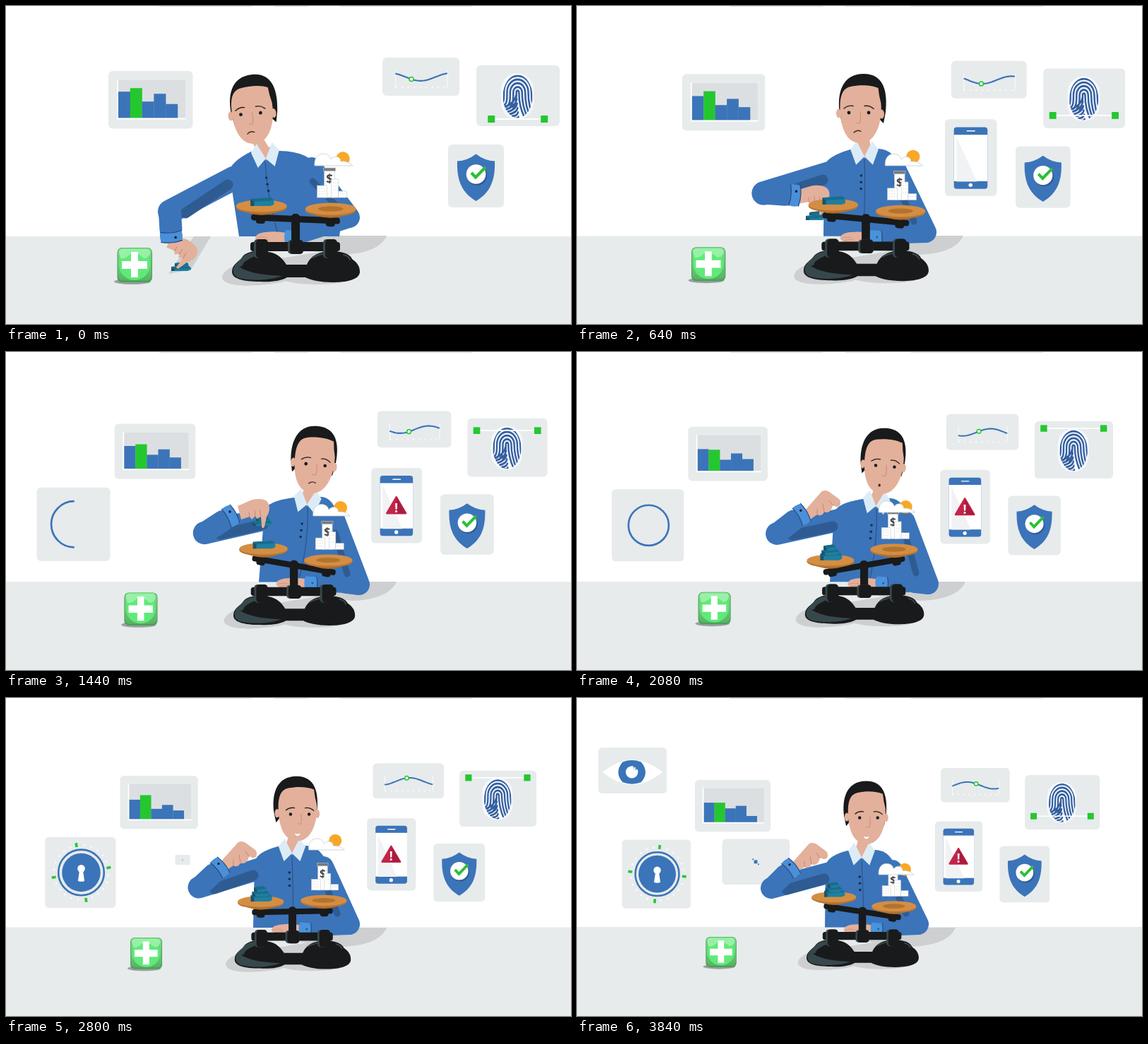
Write an HTML page that moves like this. It is 800 px wide and 450 px high and loops after 3920 ms.

```html
<!DOCTYPE html>
<html lang="en">
<head>
<meta charset="utf-8">
<title>Weighing choices</title>
<style>
html, body { margin: 0; width: 100%; height: 100%; overflow: hidden; background: #fff; }
svg { display: block; width: 800px; height: 450px; }
text { font-family: "Open Sans", Arial, sans-serif; font-weight: bold; text-anchor: middle; }
.panel { fill: #e7ebec; }
.blue { fill: #3b74b9; }
.dark { fill: #2e5c92; }
.green { fill: #25c72f; }
.white { fill: #fff; }
.skin { fill: #e3b09b; }
.ink { fill: #191a1b; }
.slate { fill: #37484d; }
.shade { fill: #cdcfd0; }
.line { fill: none; stroke-linecap: round; stroke-linejoin: round; }
.sleeve { fill: none; stroke: #3b74b9; stroke-linecap: round; stroke-linejoin: round; }
</style>
</head>
<body>
<svg id="stage" viewBox="0 0 800 450" xmlns="http://www.w3.org/2000/svg"></svg>
<script>
const LOOP = 3920, STEP = 80, LAST = 3840;
const rect = (x, y, w, h, cls, r = 0) =>
  `<rect x="${x}" y="${y}" width="${w}" height="${h}" rx="${r}" class="${cls}"/>`;
const disc = (x, y, r, cls, ry = r) => `<ellipse cx="${x}" cy="${y}" rx="${r}" ry="${ry}" class="${cls}"/>`;
const shape = (d, cls) => `<path d="${d}" class="${cls}"/>`;
const line = (d, color, w, id = "") => `<path ${id && `id="${id}"`} d="${d}" class="line" stroke="${color}" stroke-width="${w}"/>`;
const group = (id, body) => `<g id="${id}">${body}</g>`;

// One step of the blue weight, standing on y.
const tier = (x, y, w, h) => `
  <path d="M${x - w / 2} ${y - h + 2}L${x + w / 2 - 4} ${y - h}l4 4v${h - 6}l-5 2H${x - w / 2}z" fill="#1f7fa0"/>
  <path d="M${x - w / 2} ${y - h + 2}l5 4V${y}h-5z" fill="#1a5268"/>
  <path d="M${x - w / 2} ${y - h + 2}L${x + w / 2 - 4} ${y - h}l4 4L${x - w / 2 + 5} ${y - h + 6}z" fill="#1a6c8a"/>`;

const plate = well => `
  <path d="M-35 2Q-18 13 0 13Q18 13 35 2z" fill="#a9682b"/>
  <ellipse rx="36" ry="9" fill="#b97430" cy="2"/><ellipse rx="36" ry="8.5" fill="#d48e43"/>
  ${well ? '<ellipse rx="18" ry="3.8" fill="#b3732f"/>' : ""}`;

function ridges() {
  let s = "";
  for (let i = 0; i < 6; i++) {
    const r = 1.8 + i * 4.4;
    s += `M${-r - 5} ${15 - i * 1.5}C${-r} 9 ${-r} 3 ${-r} -5A${r} ${r} 0 0 1 ${r} -5C${r} 8 ${r + 3} 16 ${r + 8} 25`;
    s += `M${-20 + i * 3} ${13 + i * 2.6}Q${-4 + i} ${8 + i * 3.6} ${-2 + i * .6} ${-2 + i * 5.2}`;
  }
  return s;
}

const wall = `
<g>${rect(145, 92, 119.5, 81.5, "panel", 6)}
  <rect x="157" y="105" width="97" height="55" fill="#dcdfe1"/>
  ${[0, 1, 2, 3, 4].map(i => `<rect class="bar ${i == 1 ? "green" : "blue"}" x="${159 + i * 16.8}" width="17"/>`).join("")}
  ${line("M158 105V159.5H254", "#fff", 2)}</g>
<g>${rect(533, 73, 109, 54, "panel", 6)}
  ${line("M551.5 92V115M625 92V115", "#f8f9fa", 1.2)}
  <path d="M552 115H625" stroke="#fff" stroke-width="2" stroke-dasharray="1.5 7"/>
  ${line("", "#3b74b9", 2.2, "wave")}
  <circle id="dot" r="3" fill="#fff" stroke="#25c72f" stroke-width="1.6"/></g>
<g>${rect(666, 84, 118, 86, "panel", 6)}
  <rect x="701" y="95" width="46" height="65" rx="23" fill="#f6f9fd"/>
  <g transform="translate(724.5 128)" clip-path="url(#print)">
    <path transform="scale(1 1.2)" d="${ridges()}" fill="none" stroke="#345f9f" stroke-width="2.5" stroke-linecap="round"/></g>
  <g id="scan"><path id="beamline" stroke="#fff" stroke-width="1.8"/>
    <rect id="scanL" y="-5" width="10" height="10" class="green"/><rect id="scanR" y="-5" width="10" height="10" class="green"/></g></g>
<g>${rect(626, 196, 79, 89, "panel", 6)}
  ${shape("M665.5 209.5Q653 219 639 219.5C638 246 645 264 665.5 276C686 264 693 246 692 219.5Q678 219 665.5 209.5z", "blue")}
  <circle cx="667" cy="240" r="14" fill="#2e5c92"/>${disc(665.5, 238, 13.8, "white")}
  <path d="M659 236l6 6.5L679 228" fill="none" stroke="#2cbf33" stroke-width="4.2"/></g>
${group("phone", rect(524, 157, 75, 111, "panel", 6) +
  rect(537, 168.5, 48.5, 89, "blue", 4) + rect(537, 179.5, 48.5, 67, "white") +
  '<path d="M541 183L570 247H541z" fill="#f1f2f4"/>' +
  line("M556 174H567", "#fff", 1.5) + disc(561, 252, 2.8, "white") +
  group("alert", '<path d="M561 200L575 224H547z" fill="#c4244a" stroke="#c4244a" stroke-width="2.5" stroke-linejoin="round"/><path d="M561 200L575 224H561z" fill="#a91c40"/><text x="561" y="222.5" font-size="19" fill="#fff">!</text>'))}
${group("lock", rect(30, 186, 108.5, 108.5, "panel", 6) + `
  <circle id="ring" cx="85.5" cy="240.3" fill="none" stroke="#3b74b9" stroke-width="2.8" pathLength="100" transform="rotate(-90 85.5 240.3)"/>
  <g id="core"><circle r="29.5" class="blue"/><circle cy="-6" r="5.8" class="white"/><path d="M-2.6 -4H2.6L5 13Q0 15 -5 13z" class="white"/></g>
  <g id="ticks"><circle r="42" fill="none" stroke="#fff" stroke-width="2.5" pathLength="120" stroke-dasharray="1 4"/>
  ${[0, 90, 180, 270].map(a => `<rect x="-2" y="-46" width="4" height="6.5" class="green" transform="rotate(${a})"/>`).join("")}</g>`)}
${group("vector", rect(188, 185, 106.5, 72, "panel", 6) +
  `<g transform="translate(241 221)">${rect(-2.7, -2.7, 5.4, 5.4, "blue")}<g id="nodes">${rect(-5.3, -5, 2, 2, "blue")}${rect(3.3, 3, 2, 2, "blue")}</g></g>`)}
${group("eye", rect(-7.5, 41, 108, 72, "panel", 6) +
  shape("M-1 79.5Q24 60 46 60Q69 60 94 79.5Q69 99 46 99Q24 99 -1 79.5z", "white") +
  shape("M31 63.5Q46 58 60 63.5Q74 80 60 95.5Q46 101 31 95.5Q17 80 31 63.5z", "blue") +
  disc(45.5, 79.5, 9.7, "white") + disc(51, 72.5, 3.2, "blue") + disc(50, 73.5, 1.6, "white"))}`;

const man = `
<path id="elbowShade" class="shade"/><path id="handShade" class="shade" d="M290 326H266L230 379L262 373z"/>
<path id="torso" class="blue"/>
${line("", "#2c5285", 1.1, "placket")}
${[0, 1, 2].map(() => '<circle class="button" r="1.8" fill="#16304f"/>').join("")}
<path id="armR" class="sleeve" stroke-width="30"/>
${line("", "#2e5c92", 9, "armRShade")}
<path id="foreR" class="sleeve" stroke-width="20"/>
<g id="restHand">${shape("M0 -5Q-20 -9 -33 -7Q-49 -6 -49 2Q-47 8 -30 8L0 8z", "skin")}
  ${line("M-46 1Q-38 -1 -32 1M-44 5Q-36 3 -30 4", "#c98f79", .8)}
  <path d="M-6 -10L10 -9V10L-6 10Q-10 0 -6 -10z" fill="#4a92dc"/>${disc(4, 0, 1.6, "dark")}${line("M10 -9Q13 0 10 10", "#23487a", 1)}</g>
<path id="neck" class="skin"/>
<g id="collar">${shape("M-9 -8L0 11L9 -8z", "skin")}
  <path d="M-11 -14L-20 -2L-12 20L0 8zM11 -14L20 -2L12 20L0 8z" fill="#dcecf7"/></g>
<g id="head">
  ${shape("M-32 6C-36 -22 -29 -50 2 -50C31 -50 36 -24 33 4L30 20L24 14L-24 14L-29 20z", "ink")}
  <g id="face">
    ${disc(-31, 6, 3.5, "skin", 6.5)}${disc(30, 7, 3.5, "skin", 6.5)}
    ${shape("M-29 -8C-28 -22 -24 -30 -14 -32C0 -35 16 -34 25 -30Q26 -19 29 -8C31 20 21 48 0 48C-21 48 -30 24 -29 -8z", "skin")}
    <g id="features">
      ${disc(-14, 5, 2.4, "ink")}${disc(14, 5, 2.4, "ink")}
      ${line("M-21 -1Q-15 -6 -8 -4.5M8 -4.5Q15 -6 21 -.5", "#222", 1.4)}
      ${line("M2 4Q3 13 2 19Q0 20.5 -3 19.5", "#c58d78", 1)}
      <g id="frown">${line("M-7 33Q-2 28.5 3 31.5", "#4b2420", 1.4)}</g>
      <ellipse id="gasp" cx="-6" cy="34" rx="1.8" ry="2.1" fill="#4b2420"/>
      <path id="smile" d="M-8 34Q-4 36 1 34Q-1 38 -4 38Q-7 37 -8 34z" class="white"/>
    </g></g></g>
<path id="armL" class="sleeve"/>${line("", "#2e5c92", 15, "armLShade")}
<path id="foreL" class="sleeve"/>
<g id="piece">${tier(0, 7, 28, 8)}${tier(1, 0, 20, 6)}</g>
<g id="hand">
  <g id="grip">${shape("M-8 -9L10 -17C18 -20 30 -20 34 -15C39 -8 37 0 33 6L30 20C29 23 26 23 26 19L25 6L19 9L17 5L12 10L9 6L-3 10z", "skin")}
    ${line("M25 6L23 -3M17 5L16 -3M9 6L8 0", "#c48a75", 1)}</g>
  <g id="fist">${shape("M-9 -4L14 -30C18 -35 24 -33 29 -29L40 -21C44 -16 42 -9 36 -10L31 -12C30 -5 25 0 19 -3C17 3 11 3 9 1L-1 8z", "skin")}
    ${line("M31 -12L26 -19M19 -3L17 -14M9 1L9 -7", "#c48a75", 1)}</g></g>
<g id="cuff"><path d="M-7 -15Q-2 -17 7 -15Q11 0 7 15Q-2 17 -7 15Q-3 0 -7 -15z" fill="#4a8fd8"/>
  ${line("M-7 -15Q-3 0 -7 15M7 -15Q11 0 7 15", "#234a80", 1.2)}${disc(2, -6, 1.8, "ink")}</g>`;

const clamp = x => rect(x, 330, 19, 27, "slate", 5) + rect(x + 3, 330, 17, 27, "ink", 5);
const balance = `
${shape("M306 385C306 372 330 362 360 362L480 342L491 346Q475 365 440 376L390 391C350 398 310 398 306 385z", "shade")}
${disc(440, 384, 52, "shade", 10)}
${rect(404, 297, 12, 52, "ink")}
<g id="beam">${rect(-63, -5, 126, 9, "ink", 4)}${rect(-56, -5, 13, 13, "ink", 4)}${rect(43, -5, 13, 13, "ink", 4)}
  ${rect(-53, -14, 7, 12, "ink")}${rect(46, -14, 7, 12, "ink")}${rect(-6, -8, 12, 14, "ink", 5)}</g>
<g id="left">${plate(false)}${tier(1, 0, 33, 12)}<g id="stack">${tier(0, -8, 27, 9)}${tier(-1, -15, 19, 9)}</g></g>
<g id="right">${plate(true)}<g transform="translate(1 -16)" stroke="#c4c7c9" stroke-width=".6">
  ${rect(-10, -41, 15, 41, "white")}<rect x="-11" y="-42" width="17" height="4.5" fill="#777b7e"/>
  <text x="-2.5" y="-20" font-size="17" fill="#444" stroke="none">$</text>
  ${rect(-20, -17, 14, 17, "white")}${rect(0, -26, 10, 26, "white")}${rect(10, -9, 12, 9, "white")}
  <path d="M-18 -13H-8M-18 -9H-8M-18 -5H-8M2 -21H8M2 -16H8M2 -11H8M12 -5H20" stroke-dasharray="2 1.5"/></g></g>
${shape("M320 376C320 365 330 362 334 356C340 346 360 345 372 348C385 350 392 358 397 366H426C432 352 445 347 462 347C478 347 488 352 490 358C497 363 501 368 501 376C501 388 480 391 462 391C445 391 432 388 424 384H398C390 389 375 391 360 390C335 390 320 386 320 376z", "ink")}
${shape("M334 357C340 348 356 347 364 350C348 355 334 362 335 368C348 378 375 378 393 381C375 389 345 389 330 385C318 380 319 368 334 357z", "slate")}
${shape("M330 369Q345 364 365 374Q385 381 396 375L392 382C370 381 345 379 330 369z", "ink")}
${line("M434 356Q447 349 462 350M478 352Q486 354 487 359", "#37484d", 2)}
${rect(346, 334, 127, 13, "ink", 4)}${clamp(351)}${clamp(449)}${rect(399, 331, 22, 20, "slate", 5)}${rect(402, 331, 19, 20, "ink", 5)}`;

const plus = `
<ellipse cx="179" cy="390" rx="26" ry="4" fill="#9b9fa0"/>
<rect x="157.5" y="342" width="49.5" height="49" rx="7" fill="#4b9f59"/>
<rect x="158.5" y="342.5" width="47.5" height="46" rx="6.5" fill="url(#lime)"/>
${disc(182, 366, 22, "", 22).replace("/>", ' fill="#5fea78"/>')}
<path d="M160 348Q160 344 165 344H199Q204 344 204 349Q203 357 195 357Q188 349 176 351Q168 359 162 357z" fill="#b2f7bd" opacity=".65"/>
<path d="M177 348H187V361H200V372H187V384H177V372H164V361H177z" fill="#fff"/>`;

document.getElementById("stage").innerHTML = `
<defs><clipPath id="print"><ellipse rx="21" ry="30.5"/></clipPath>
<linearGradient id="lime" x1="0" y1="0" x2="0" y2="1"><stop offset="0" stop-color="#79e488"/><stop offset="1" stop-color="#58b365"/></linearGradient></defs>
<path d="M217 0H348M380 0H428M473 0H660" stroke="#dfe1f2" stroke-width="2"/>
${group("wall", wall)}
<rect id="table" width="800" height="130" class="panel"/>
${man}
${group("scale", balance)}
<g id="sky"><circle id="sun" r="9.7" fill="#f9a825"/>
  <path d="M-27 0C-28 -11 -22 -17 -15 -17C-8 -17 -5 -13 -4 -9C0 -15 10 -14 10 -6C17 -7 23 -4 27 0z" fill="#fff" stroke="#c6c9cb" stroke-width=".8"/></g>
${group("button", plus)}`;

const el = {};
document.querySelectorAll("[id]").forEach(n => el[n.id] = n);
const bars = [...document.querySelectorAll(".bar")], buttons = [...document.querySelectorAll(".button")];
const set = (id, name, v) => el[id].setAttribute(name, v);
const move = (id, v) => set(id, "transform", v);
const draw = (id, d) => set(id, "d", d);
const show = (id, on) => set(id, "opacity", +on);

// Monotone cubic interpolation of rows [time, ...values].
function at(rows, t) {
  const n = rows.length - 1;
  if (t <= rows[0][0]) return rows[0].slice(1);
  if (t >= rows[n][0]) return rows[n].slice(1);
  let i = 0;
  while (t >= rows[i + 1][0]) i++;
  const h = rows[i + 1][0] - rows[i][0], u = (t - rows[i][0]) / h;
  return rows[i].slice(1).map((a, c) => {
    const b = rows[i + 1][c + 1];
    const sec = k => (rows[k + 1][c + 1] - rows[k][c + 1]) / (rows[k + 1][0] - rows[k][0]);
    const slope = k => {
      if (k == 0) return sec(0);
      if (k == n) return sec(n - 1);
      const p = sec(k - 1), q = sec(k);
      return p * q <= 0 ? 0 : 2 * p * q / (p + q);
    };
    const u2 = u * u, u3 = u2 * u;
    return a * (2 * u3 - 3 * u2 + 1) + b * (3 * u2 - 2 * u3)
      + h * (slope(i) * (u3 - 2 * u2 + u) + slope(i + 1) * (u3 - u2));
  });
}
const ramp = (t, a, b) => {
  const u = Math.min(1, Math.max(0, (t - a) / (b - a)));
  return u * u * (3 - 2 * u);
};

const TIMES = [0, 640, 1440, 2080, 2800, 3200, 3840];
const keyed = rows => rows.map((r, i) => [TIMES[i], ...r]);

const BARS = keyed([[37.5, 42.5, 23.5, 34.5, 20], [35, 42, 22, 31, 19], [34, 36.5, 21, 29, 17], [33, 32, 17, 26.5, 18],
  [30, 37, 16, 22, 13.5], [30, 38, 17, 21, 10.5], [31, 31, 22, 26, 10]]);
const SCAN = keyed([[160, 37.5], [151.7, 45], [102, 45], [94.6, 45], [95, 45], [104, 45], [149, 45]]);
// x, y, turn, size, look
const HEAD = keyed([[351, 147, -5, 1, -5], [404, 146, 0, 1, -5], [435, 153, 6, .97, 4], [432.5, 155, 5, .95, 4.5],
  [409.5, 157.5, 0, .935, 7], [409.5, 159, 0, .925, 7], [407.5, 163, 0, .91, 6]]);
// left shoulder, neck, right shoulder, right elbow, hip
const BODY = keyed([[316, 226, 367, 208, 430, 212, 486, 299, 330], [350, 219, 407, 205, 448, 214, 494, 320, 349],
  [366, 217, 427, 208, 462, 220, 500, 329, 358], [364, 220, 424, 210, 461, 223, 497, 328, 358],
  [352, 224, 405, 212, 446, 222, 486, 320, 350], [352, 225, 404, 214, 445, 223, 485, 320, 351],
  [352, 229, 403, 218, 443, 227, 483, 320, 351]]);
// left elbow, cuff, hand, hand turn
const ARM = keyed([[232, 291, 234, 326, 236, 336, 42], [264, 265, 308, 268, 320, 270, 8], [281, 256, 318, 232, 336, 227, 0],
  [283, 257, 318, 230, 331, 229, 0], [273, 268, 303, 240, 313, 236, 0], [274, 268, 303, 240, 313, 236, 0], [275, 269, 303, 241, 313, 238, 0]]);
const TILT = [[0, 2.4], [640, 5.4], [1440, 10], [1680, 10], [2080, -9.8], [2800, -1], [3200, 12], [3840, 8.7]];
// cloud x, y, sun height
const SKY = keyed([[464, 226, -10], [463, 226, -13], [461, 232, -12], [453, 227, -8], [454, 215, -14], [455, 237, -14], [452, 250, -8]]);
const PIECE = [[0, 248, 368], [640, 338, 296], [1440, 363, 239], [1520, 363, 239], [1680, 365, 262]];
const RING = [[1440, 34], [2080, 30.3], [2800, 35], [3840, 34.5]];
const TICK = [[2480, -22], [2800, -10], [3200, -1.5], [3840, 5.2]];

const about = (x, y, s) => `translate(${x} ${y}) scale(${s}) translate(${-x} ${-y})`;
const pop = (id, x, y, s) => move(id, about(x, y, Math.max(s, .0001)));

function drawWall(t, p) {
  move("wall", about(358, 326, 1 - .103 * p));
  at(BARS, t).forEach((h, i) => {
    bars[i].setAttribute("y", 158.7 - h);
    bars[i].setAttribute("height", h);
  });
  const crest = 77 - t * .0141;
  const waveY = x => 100.5 - 5.4 * Math.cos((x - crest) * Math.PI / 42);
  let d = "";
  for (let x = 0; x <= 72; x += 2) d += `${x ? "L" : "M"}${552 + x} ${waveY(x).toFixed(2)}`;
  draw("wave", d);
  const mark = 22 + 15 * t / LAST;
  move("dot", `translate(${552 + mark} ${waveY(mark)})`);

  const [sy, half] = at(SCAN, t);
  move("scan", `translate(724.7 ${sy})`);
  draw("beamline", `M${-half} 0H${half}`);
  set("scanL", "x", -half - 5);
  set("scanR", "x", half - 5);

  pop("phone", 561.5, 212.5, ramp(t, 160, 560));
  pop("alert", 561, 214, ramp(t, 880, 1120));
  pop("lock", 84, 240, ramp(t, 760, 1120));
  pop("vector", 241, 221, ramp(t, 2680, 3080));
  pop("eye", 46.5, 77, ramp(t, 3400, 3720));
  const arc = Math.min(100, Math.max(0, (t - 1200) / 4.8));
  set("ring", "r", at(RING, t)[0]);
  set("ring", "stroke-dasharray", "100 100");
  set("ring", "stroke-dashoffset", -(100 - arc));
  show("ring", arc > 0);
  move("core", `translate(85.5 240.3) scale(${Math.max(.0001, ramp(t, 2160, 2560))})`);
  move("ticks", `translate(85.5 240.3) rotate(${at(TICK, t)[0]})`);
  show("ticks", ramp(t, 2480, 2720));
  move("nodes", `rotate(${t < 3520 ? 90 : 0})`);
}

function drawMan(t, p) {
  const [sx, sy, nx, ny, rx, ry, ex, ey, hip] = at(BODY, t);
  const [hx, hy, turn, size, look] = at(HEAD, t);
  const [lx, ly, wx, wy, gx, gy, spin] = at(ARM, t);
  const base = 326 - 1.5 * p, mid = hip + 56, fat = 34 - 4 * p;

  draw("elbowShade", `M${ex + 53} 325Q${ex + 42} 350 ${ex - 10} 352L${ex - 70} 345V325z`);
  show("handShade", 1 - ramp(t, 80, 480));
  draw("torso", `M${hip} ${base}L${sx} ${sy + 8}Q${sx + 3} ${sy - 6} ${nx - 20} ${ny - 2}L${nx + 20} ${ny - 3}Q${rx + 2} ${ny - 2} ${rx + 10} ${ry + 18}L${ex - 10} ${ey}L${ex - 14} ${base}z`);
  draw("placket", `M${nx} ${ny + 12}Q${nx + 2} ${ny + 60} ${mid} ${base}`);
  buttons.forEach((b, i) => {
    const y = 35 + i * 9.3;
    b.setAttribute("cx", nx - 4 + (mid - nx) * y / 118);
    b.setAttribute("cy", ny + y);
  });
  draw("armR", `M${rx + 3} ${ry + 17}L${ex} ${ey}`);
  draw("armRShade", `M${rx + 4} ${ry + 36}L${ex - 17} ${ey - 15}`);
  draw("foreR", `M${ex} ${ey + 5}L${hip + 84} 327`);
  move("restHand", `translate(${hip + 72} 327) scale(${1 - .08 * p})`);

  draw("neck", `M${hx - 9 + turn * -.4} ${hy + 36}L${nx - 10} ${ny + 1}L${nx} ${ny + 8}L${nx + 10} ${ny + 1}L${hx + 9 - turn * .4} ${hy + 36}z`);
  move("collar", `translate(${nx} ${ny}) rotate(${turn}) scale(${1 - .06 * p})`);
  move("head", `translate(${hx} ${hy}) rotate(${turn}) scale(${size})`);
  move("face", `translate(${look * .5} 0)`);
  move("features", `translate(${look * .5} ${look > 0 ? look * .35 : 0})`);
  show("frown", t < 1760);
  show("gasp", t >= 1760 && t < 2400);
  show("smile", t >= 2400);

  const ux = sx + 6, uy = sy + 18;
  set("armL", "stroke-width", fat);
  draw("armL", `M${ux} ${uy}L${lx} ${ly}`);
  draw("armLShade", `M${ux - 8} ${uy + 9}L${lx + 22} ${ly + 2}`);
  set("foreL", "stroke-width", fat - 2);
  draw("foreL", `M${lx} ${ly}L${wx + (lx - wx) * .3} ${wy + (ly - wy) * .3}`);
  const a = Math.atan2(gy - ly, gx - lx) * 180 / Math.PI;
  move("cuff", `translate(${wx} ${wy}) rotate(${a}) scale(${1 - .1 * p})`);
  move("hand", `translate(${gx} ${gy}) rotate(${spin})`);
  show("grip", t < 1680);
  show("fist", t >= 1680);
  const [px, py] = at(PIECE, t);
  move("piece", `translate(${px} ${py})`);
  show("piece", t < 1680);
}

function drawScale(t, p) {
  const zoom = about(361, 309, 1 - .122 * p);
  move("scale", zoom);
  move("button", zoom);
  const deg = at(TILT, t)[0], a = deg * Math.PI / 180, c = Math.cos(a), s = Math.sin(a);
  move("beam", `translate(410 302) rotate(${deg})`);
  const place = (id, x, y) => move(id, `translate(${410 + x * c - y * s} ${302 + x * s + y * c})`);
  place("left", -49, -17);
  place("right", 49, -17);
  show("stack", t >= 1680);
  const [x, y, sun] = at(SKY, t);
  move("sky", `translate(${x} ${y}) scale(${1 - .08 * p})`);
  move("sun", `translate(13 ${sun})`);
}

const start = performance.now();
function frame() {
  const t = Math.floor((performance.now() - start) % LOOP / STEP) * STEP;
  const q = t / LAST, p = q * (1.1 - .1 * q);
  set("table", "y", 326 - 2 * p);
  drawWall(t, p);
  drawMan(t, p);
  drawScale(t, p);
  requestAnimationFrame(frame);
}
frame();
</script>
</body>
</html>
```
